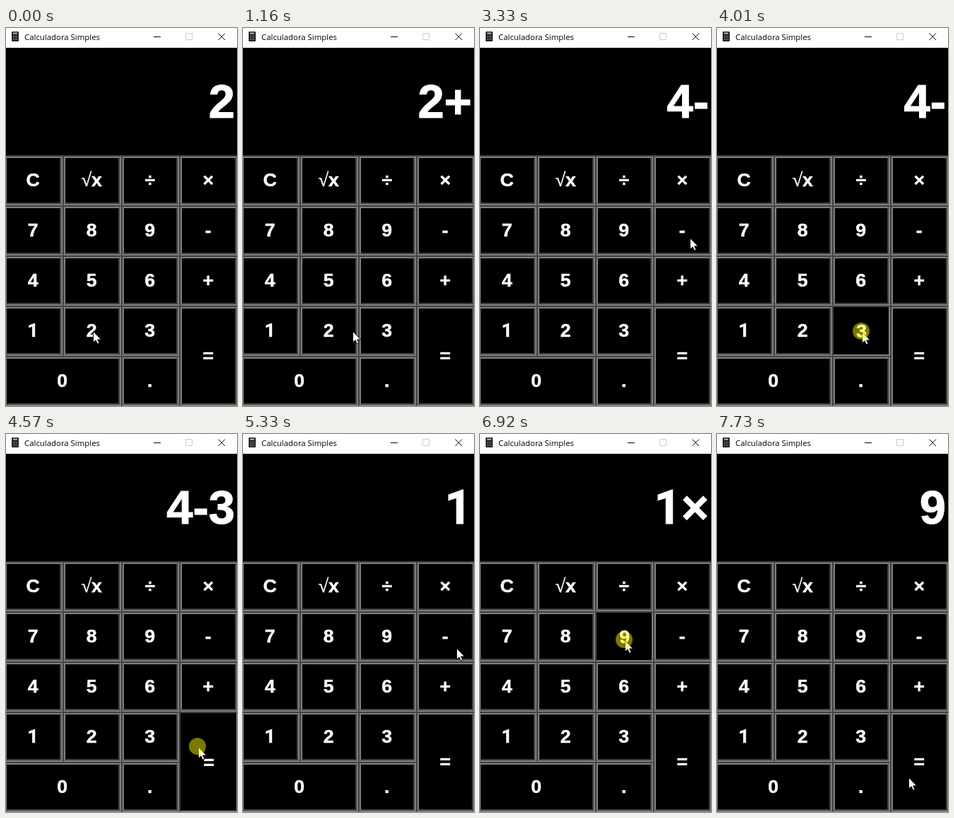
Write an HTML page that moves like this. It is 327 by 535 pixels and loops after 8000 ms.

```html
<!DOCTYPE html>
<html lang="pt">
<head>
<meta charset="utf-8">
<title>Calculadora Simples</title>
<style>
html, body { margin: 0; width: 100%; height: 100%; overflow: hidden; background: #000; }
svg { display: block; width: 327px; height: 535px; }
text { fill: #fff; stroke: #fff; stroke-width: .5px; font: bold 26.67px "Liberation Sans", Arial, sans-serif; }
#bar text { fill: #000; stroke: none; font: 11.4px "Open Sans", "Noto Sans", sans-serif; }
#out { font-size: 67px; stroke-width: 1px; text-anchor: end; }
#keys text { text-anchor: middle; }
.root { font-family: "Liberation Serif", serif; font-weight: 400; }
.one { font-family: Roboto, sans-serif; }
</style>
</head>
<body>
<svg viewBox="0 0 327 535">
  <rect width="327" height="535"/>
  <g id="bar">
    <rect width="327" height="28" fill="#fff"/>
    <rect x="8" y="5" width="10" height="14" rx="1" fill="#222"/>
    <path d="M10 7.5h6" stroke="#bbb" stroke-width="2"/>
    <path d="M10 11.5h6M10 14h6M10 16.5h6" stroke="#aaa" stroke-width="1.2" stroke-dasharray="1.2 1.2"/>
    <text x="26" y="17">Calculadora Simples</text>
    <g fill="none" stroke="#000">
      <path d="M209 12.5h10"/>
      <path d="M254.5 7.5h9v9h-9z" stroke="#ccc"/>
      <path d="M300.5 7.5l9.5 9.5M310 7.5l-9.5 9.5"/>
    </g>
  </g>
  <text id="out" x="324" y="127.4"></text>
  <g id="keys"></g>
  <path id="mouse" d="M.5 .5V16L4 12.8L6.6 18.2L9 17.1L6.6 11.9H11.6Z" fill="#fff" stroke="#000" stroke-width=".9"/>
  <circle id="halo" cx="-1" cy="-1" r="12" fill="#ff0" fill-opacity=".48"/>
</svg>
<script>
const LOOP = 8000, TRAVEL = 280, TICK = 70;
const DARK = "#404040", LIGHT = "#7f7f7f";
const $ = id => document.getElementById(id);

function make(parent, tag, attrs = {}) {
  const el = document.createElementNS("http://www.w3.org/2000/svg", tag);
  for (const k in attrs) el.setAttribute(k, attrs[k]);
  return parent.appendChild(el);
}

// Some characters use another face
const faces = { "√": "root", "1": "one" };
function write(el, str) {
  el.replaceChildren();
  for (const ch of str) make(el, "tspan", { class: faces[ch] || "" }).textContent = ch;
}

// Mitred two-tone bevel, 2px wide, around a black face
function bevel(g, x, y, w, h, topLeft, bottomRight) {
  const path = (d, fill) => make(g, "path", { d, fill, "shape-rendering": "crispEdges" });
  path(`M${x} ${y}h${w}v${h}h${-w}z`, bottomRight);
  path(`M${x} ${y}h${w}l-2 2L${x + 2} ${y + h - 2}l-2 2z`, topLeft);
  path(`M${x + 2} ${y + 2}h${w - 4}v${h - 4}h${4 - w}z`, "#000");
}

const colX = c => Math.round(82.75 * c - 3);
const rowY = r => 180 + 71 * r;
const keys = {};

function addKey(label, c, r, cols = 1, rows = 1) {
  const x = colX(c), y = rowY(r), w = colX(c + cols) - x, h = rowY(r + rows) - y;
  const cx = x + w / 2, cy = y + h / 2;
  const g = make($("keys"), "g");
  bevel(g, x, y, w, h, DARK, LIGHT);
  const groove = make(g, "g");
  bevel(groove, x + 2, y + 2, w - 4, h - 4, LIGHT, DARK);
  const text = make(g, "text", { x: cx - 0.3, y: cy + 8.5 });
  write(text, label === "√" ? "√x" : label);
  keys[label] = { groove, text, cx, cy };
}

["C√÷×", "789-", "456+", "123"].forEach((line, r) =>
  [...line].forEach((label, c) => addKey(label, c, r)));
addKey("0", 0, 4, 2);
addKey(".", 2, 4);
addKey("=", 3, 3, 1, 2);

// Pointer stops: key, offset from its centre, departure, optional press and hold
const stop = (key, dx, dy, leave, press = Infinity, hold = 130) =>
  ({ key, leave, press, release: press + hold, x: keys[key].cx + dx, y: keys[key].cy + dy });

const stops = [
  stop("2", 1, 0, -TRAVEL),
  stop("+", 10, 4, 200, 700),
  stop("2", 33, 0, 840, 1350),
  stop("=", 10, -9, 1510, 2040, 200),
  stop("+", 21, 8, 2440),
  stop("-", 10, 10, 2920, 3180),
  stop("3", 1, 1, 3460, 3940),
  stop("=", -15, -21, 4150, 4510),
  stop("-", 18, -35, 4910),
  stop("+", 12, 10, 5190),
  stop("×", 3, 17, 5700, 6370),
  stop("9", 1, 5, 6500, 6800),
  stop("=", -21, -19, 6960),
  stop("=", -16, 22, 7330, 7600)
];

const ops = {
  "+": (a, b) => a + b, "-": (a, b) => a - b,
  "×": (a, b) => a * b, "÷": (a, b) => a / b
};
function type(expr, key) {
  if (key !== "=") return expr + key;
  const [, a, op, b] = expr.match(/^(\d+)(\D)(\d+)$/);
  return String(ops[op](+a, +b));
}

function pointer(t) {
  const i = stops.findLastIndex(s => s.leave <= t);
  const to = stops[i], from = stops[i - 1] || to;
  const u = Math.min(1, (t - to.leave) / TRAVEL), e = u * u * (3 - 2 * u);
  return [from.x + (to.x - from.x) * e, from.y + (to.y - from.y) * e].map(Math.round);
}

function draw(t) {
  const shown = stops.filter(s => s.release <= t).reduce((expr, s) => type(expr, s.key), "2");
  const down = stops.find(s => s.press <= t && t < s.release);
  write($("out"), shown);
  for (const label in keys) {
    const { groove, text } = keys[label], on = down && down.key === label;
    groove.setAttribute("visibility", on ? "hidden" : "visible");
    text.setAttribute("transform", on ? "translate(1 1)" : "translate(0 0)");
  }
  const place = `translate(${pointer(Math.floor(t / TICK) * TICK).join(" ")})`;
  $("mouse").setAttribute("transform", place);
  $("halo").setAttribute("transform", place);
  $("halo").setAttribute("visibility", down ? "visible" : "hidden");
}

const start = performance.now();
function frame() {
  draw((performance.now() - start) % LOOP);
  requestAnimationFrame(frame);
}
frame();
</script>
</body>
</html>
```
